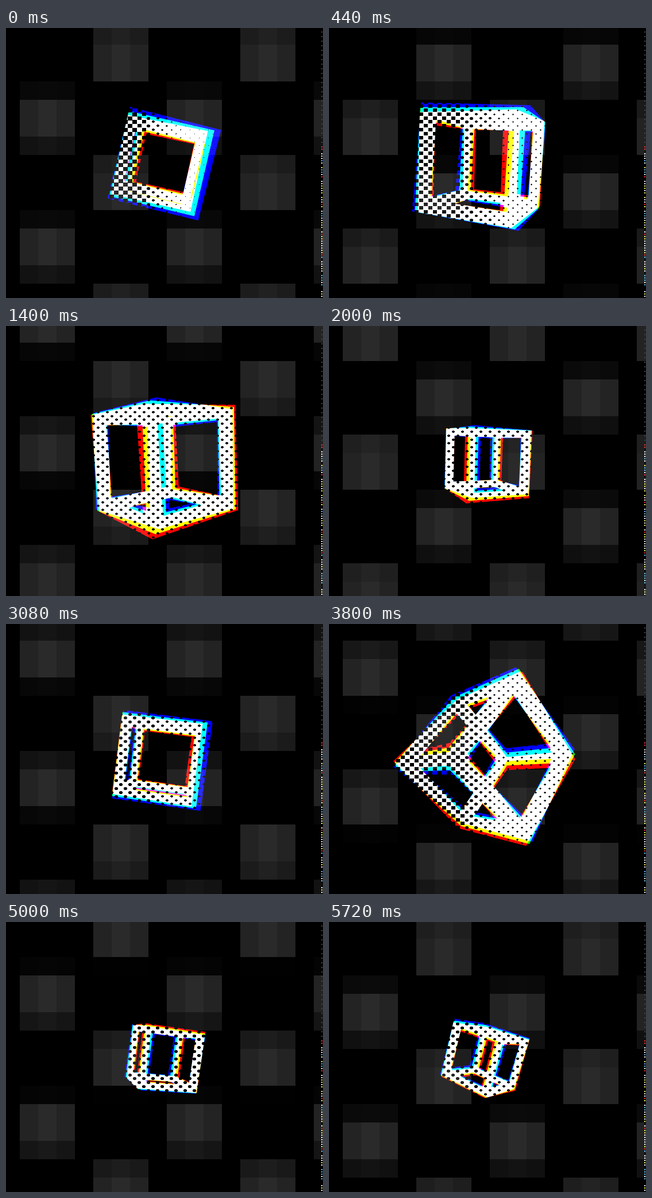
Animation of 552 by 470 pixels, one loop 5.76 s. Source, as an HTML page with a canvas:

```html
<!DOCTYPE html>
<html lang="en">
<head>
<meta charset="utf-8">
<title>Halftone cube</title>
<style>
  html, body { margin: 0; width: 100%; height: 100%; overflow: hidden; background: #000; }
  canvas { display: block; }
</style>
</head>
<body>
<canvas id="stage" width="552" height="470"></canvas>
<script>
const W = 552, H = 470, LOOP = 5760, STEP = 40;
const CX = 273, CY = 235, FOCAL = 470, BAR = 0.22;
const DOT_X = 8, DOT_Y = DOT_X * H / W;
const stage = document.getElementById('stage').getContext('2d');
const layerCanvas = document.createElement('canvas');
layerCanvas.width = W;
layerCanvas.height = H;
const layer = layerCanvas.getContext('2d');

// time, yaw, pitch, roll, size trim, dot size left and right,
// then the channel spread: yaw, pitch, roll, scale, x, y
const KEYS = [
  [0,    1.5,  1,  13,  10, 8.6, 1.2,  -3,  0,   1,  .06,  1,  0],
  [880,   40,  4,  -3, -11, 5.6, 5.2,  -3, -2,   2,    0,  0, -1],
  [2000,  62,  4,   2,  -1, 5.2, 5.0,  -3, -2,   0, -.02,  0, -1],
  [3080,  95,  2, 7.5,  -4, 6.2, 4.6, -2.5, 0,   0,  .04,  2,  0],
  [3800, 150, 25, -41, -14, 7.4, 3.6, 1.5,  2,  -3,    0,  0, -2],
  [4400, 206,  3,  -3,   1, 6.4, 6.2, -2.5, 2,   0, -.02, -1,  2],
  [5720, 301, 11,  15,  -5, 5.8, 5.2,  -3,  0,   1,  .01,  0, -2]
];

const clamp = (v, lo, hi) => Math.min(hi, Math.max(lo, v));
const rad = deg => deg * Math.PI / 180;
const mod = (v, n) => ((v % n) + n) % n;

function slope(k, c) {
  const a = KEYS[Math.max(0, k - 1)], b = KEYS[Math.min(KEYS.length - 1, k + 1)];
  return (b[c] - a[c]) / (b[0] - a[0]);
}

// Cubic Hermite interpolation of every column
function poseAt(time) {
  const t = Math.min(time, KEYS[KEYS.length - 1][0]);
  let k = 0;
  while (k < KEYS.length - 2 && t >= KEYS[k + 1][0]) k++;
  const a = KEYS[k], b = KEYS[k + 1], span = b[0] - a[0];
  const u = (t - a[0]) / span, u2 = u * u, u3 = u2 * u;
  return a.map((v, c) =>
    v * (2 * u3 - 3 * u2 + 1) + b[c] * (3 * u2 - 2 * u3) +
    span * (slope(k, c) * (u3 - 2 * u2 + u) + slope(k + 1, c) * (u3 - u2)));
}

// Twelve square bars, each as eight corners
const bars = [];
for (let axis = 0; axis < 3; axis++) {
  for (const s of [-1, 1]) for (const r of [-1, 1]) {
    const corners = [];
    for (const along of [-1, 1]) for (const p of [1, 1 - BAR]) for (const q of [1, 1 - BAR]) {
      const v = [];
      v[axis] = along;
      v[(axis + 1) % 3] = s * p;
      v[(axis + 2) % 3] = r * q;
      corners.push(v);
    }
    bars.push(corners);
  }
}

// The size sets the camera distance, so a larger cube has stronger perspective
function projector(yaw, pitch, roll, size, ox, oy) {
  const [sy, sp, sr] = [yaw, pitch, roll].map(a => Math.sin(rad(a)));
  const [cy, cp, cr] = [yaw, pitch, roll].map(a => Math.cos(rad(a)));
  const distance = FOCAL / size;
  return ([x, y, z]) => {
    const x1 = x * cy - z * sy, z1 = x * sy + z * cy;
    const y2 = y * cp + z1 * sp, z2 = z1 * cp - y * sp;
    const f = FOCAL / (distance - z2);
    return [CX + ox + f * (x1 * cr - y2 * sr), CY + oy + f * (x1 * sr + y2 * cr)];
  };
}

function halfHull(points) {
  const out = [];
  for (const p of points) {
    while (out.length > 1) {
      const a = out[out.length - 2], b = out[out.length - 1];
      if ((b[0] - a[0]) * (p[1] - a[1]) > (b[1] - a[1]) * (p[0] - a[0])) break;
      out.pop();
    }
    out.push(p);
  }
  out.pop();
  return out;
}

function hull(points) {
  points.sort((a, b) => a[0] - b[0] || a[1] - b[1]);
  return halfHull(points).concat(halfHull(points.slice().reverse()));
}

function drawCube(time) {
  const [, yaw, pitch, roll, trim, dotL, dotR, dYaw, dPitch, dRoll, dScale, dx, dy] = poseAt(time);
  const size = 74 + 32 * Math.cos(2 * Math.PI * (time - 1000) / 2880) + trim;

  layer.globalCompositeOperation = 'source-over';
  layer.clearRect(0, 0, W, H);
  layer.globalCompositeOperation = 'lighter';
  ['#f00', '#0f0', '#00f'].forEach((color, i) => {
    const s = i - 1;
    const project = projector(yaw + s * dYaw, pitch + s * dPitch, roll + s * dRoll,
      size * (1 + s * dScale), s * dx, s * dy);
    layer.fillStyle = color;
    layer.beginPath();
    for (const bar of bars) {
      hull(bar.map(project)).forEach(([x, y], n) => n ? layer.lineTo(x, y) : layer.moveTo(x, y));
      layer.closePath();
    }
    layer.fill();
  });

  // Staggered dot screen, counted from the middle of the stage
  layer.globalCompositeOperation = 'destination-out';
  for (let row = -30; row < 30; row++) {
    for (let col = -26 + mod(row, 2); col < 26; col += 2) {
      const x = W / 2 + (col + 0.5) * DOT_X;
      const y = H / 2 + (row + 0.5) * DOT_Y;
      const d = clamp(dotL + (dotR - dotL) * clamp((x - 215) / 95, 0, 1), 0, DOT_X);
      cutDot(x, Math.round(y), Math.round(d));
    }
  }
  stage.globalCompositeOperation = 'lighter';
  stage.drawImage(layerCanvas, 0, 0);
  stage.globalCompositeOperation = 'source-over';
}

// Flat block when full, plus-shaped when smaller
function cutDot(x, y, d) {
  const tall = Math.max(1, Math.round(d * H / W));
  const inset = d > 6 ? 0 : 2;
  const w = Math.max(1, d - inset), h = Math.max(1, tall - inset);
  layer.fillRect(x - (d >> 1), y - (h >> 1), d, h);
  layer.fillRect(x - (w >> 1), y - (tall >> 1), w, tall);
}

// Scrolling checker of soft blobs seen through a 32 px mosaic
function drawBackdrop(time) {
  stage.fillStyle = '#000';
  stage.fillRect(0, 0, W, H);
  const scroll = 161 + 224 * time / LOOP;
  for (let col = 0; col < 17; col++) {
    const part = col % 4;
    if (part === 3) continue;
    const centre = scroll + (Math.floor(col / 4) % 2) * 112;
    for (let row = 0; row < 15; row++) {
      const y = row * 32 - 3;
      const dist = Math.abs(mod(y + 16 - centre + 112, 224) - 112);
      const v = Math.round(42 * (part === 1 ? 1 : 0.84) * clamp((58 - dist) / 28, 0, 1));
      stage.fillStyle = `rgb(${v},${v},${v})`;
      stage.fillRect(24 + col * 32, y, 32, 32);
    }
  }
}

function drawEdge() {
  const tints = ['#fff', '#f33', '#fff', '#ff6', '#000', '#6cf', '#fff'];
  for (let y = 2; y < H; y += 4) {
    const n = Math.floor(mod(Math.sin(y * 12.9898) * 43758.5453, 1) * tints.length);
    const upper = y < 205;
    if (upper && y % 8 === 2) continue;
    stage.fillStyle = upper ? '#444' : tints[n];
    stage.fillRect(549, y, 2, 2);
  }
}

function draw(time) {
  drawBackdrop(time);
  drawCube(time);
  drawEdge();
}

const start = performance.now();
function tick() {
  const time = (performance.now() - start) % LOOP;
  draw(Math.floor(time / STEP) * STEP);
  requestAnimationFrame(tick);
}
tick();
</script>
</body>
</html>
```
